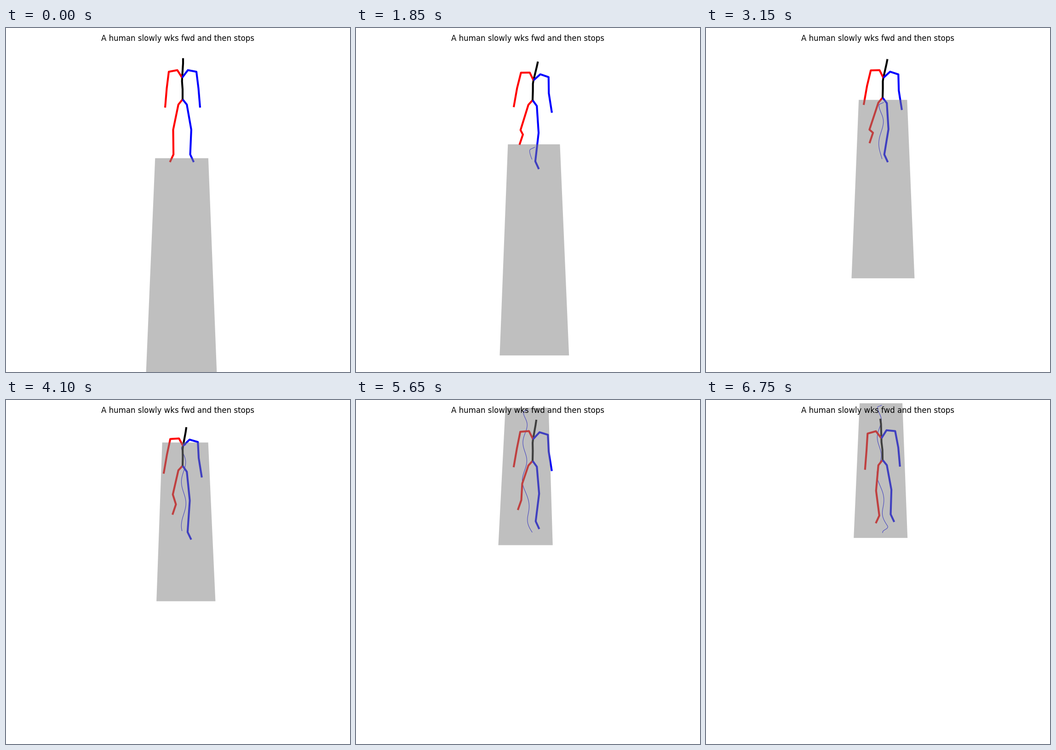
Write a matplotlib script that moves like this. It is 748 px wide and 748 px high and loops after 6800 ms.

```python
import numpy as np
import matplotlib.pyplot as plt
from matplotlib.animation import FuncAnimation
from matplotlib.patches import Polygon

SIZE, DPI = 748, 100
FRAMES, STEP = 136, 50
RED, BLUE, BLACK = "red", "blue", "black"

# Standing pose in pixels from the pelvis; the arm is the left one
SPINE = np.array([(0, 0), (0, -21.5), (-1.3, -39), (-1, -47), (1, -78), (1, -89.5)])
ARM = np.array([(11.5, -63.5), (30, -60), (34.5, -24), (38, 18)])

CYCLE = 1210            # two steps, in ms
FIRST_LANDING, LAST_LANDING = 1690, 6280
THIGH, SHIN, FOOT = 60.5, 66.5, 24
FLAT, LIFT, TOE_OUT = 17, 38, 8


def ease(s):
    s = np.clip(s, 0, 1)
    return s * s * (3 - 2 * s)


def ramp(t, start, length):
    return ease((t - start) / length)


def walking(t):
    """0 while standing, 1 in full stride."""
    return ramp(t, 900, 500) * (1 - ramp(t, 5850, 600))


def wave(t, peak):
    return np.cos(2 * np.pi * (t - peak) / CYCLE)


def curve(t, points):
    """Monotone cubic through the given points."""
    ts, vs = np.array(points, float).T
    t = np.clip(t, ts[0], ts[-1])
    h = np.diff(ts)
    d = np.diff(vs) / h
    m = np.zeros(len(ts))
    same = d[:-1] * d[1:] > 0
    a, b = d[:-1][same], d[1:][same]
    m[1:-1][same] = 2 * a * b / (a + b)
    k = np.clip(np.searchsorted(ts, t, side="right") - 1, 0, len(h) - 1)
    s = (t - ts[k]) / h[k]
    return (vs[k] + (vs[k + 1] - vs[k]) * s * s * (3 - 2 * s)
            + h[k] * s * (1 - s) * (m[k] * (1 - s) - m[k + 1] * s))


def root_z(t):
    return curve(t, [(900, 0), (1400, 14), (1850, 70), (3150, 316),
                     (4100, 500), (4900, 654), (5650, 743.5), (6750, 778)])


def root_x(t):
    """Drift of the path plus the sway of each stride."""
    drift = (-6.5 * ramp(t, 900, 500) + 15.5 * ramp(t, 3900, 1500)
             - 6.5 * ramp(t, 5950, 500))
    return drift - 5.5 * walking(t) * wave(t, 1500)


def project(x, h, z):
    """Camera pitched 30 degrees down; h is height, z points to the viewer."""
    v = 90 + 0.866 * h - 0.5 * z
    depth = 0.5 * h + 0.866 * z - 157
    scale = 1 / (1 - depth / 2600)
    return np.array([384 + x * scale, 374 - v * scale])


def plan_steps():
    """Lift time, landing time and foothold of every step, keyed by side."""
    steps = {-1: [], 1: []}
    landings = [FIRST_LANDING + CYCLE / 2 * n for n in range(7)] + [LAST_LANDING]
    for n, land in enumerate(landings):
        side = 1 if n % 2 == 0 else -1
        x = -12 + 20 * ramp(land, 3900, 1400) + 13 * side
        z = min(root_z(land) + 58, 778)
        steps[side].append((land - min(640 + 60 * n, 840), land, x, z))
    return steps


STEPS = plan_steps()


def foot(t, side):
    """Ankle x, z, rise above the ground and foot pitch in radians."""
    x = 17.5 if side > 0 else -21 - 7 * ramp(t, 250, 500)
    z, rise, pitch = 0, 0, 19
    for lift, land, nx, nz in STEPS[side]:
        s = np.clip((t - lift) / (land - lift), 0, 1)
        size = min(1, (nz - z) / 130)
        go = ease(s ** 1.6)
        rise += LIFT * size * np.sin(np.pi * s ** 1.15) ** 2
        pitch += size * np.interp(s, [0, 0.28, 0.6, 0.9, 1], [0, 40, 40, -20, 0])
        x, z = x + (nx - x) * go, z + (nz - z) * go
        if s < 1:
            break
    return x, z, rise, np.radians(pitch)


def leg(hip, ankle, pitch, side):
    """Two-bone leg whose knee bends forward and a little outward."""
    (hx, hh, hz), (kx, kh, kz) = hip, ankle
    full = np.hypot(kh - hh, kz - hz)
    uh, uz = (kh - hh) / full, (kz - hz) / full
    reach = min(full, THIGH + SHIN - 0.2)
    along = (THIGH ** 2 - SHIN ** 2 + reach ** 2) / (2 * reach)
    bend = np.sqrt(max(THIGH ** 2 - along ** 2, 0))
    along *= full / reach
    knee = ((hx + kx) / 2 + side * (5 + 0.2 * bend),
            hh + uh * along + uz * bend,
            hz + uz * along - uh * bend)
    toe = (kx + side * TOE_OUT,
           kh - FOOT * np.sin(pitch), kz + FOOT * np.cos(pitch))
    return [project(*p) for p in (hip, knee, ankle, toe)]


def upper_body(t):
    """Spine, right arm and left arm, leaning and dipping with the stride."""
    lean = walking(t) * (1 + 7 * wave(t, 1850)) - 4.5 * ramp(t, 5850, 600)
    dip = 5.5 * ramp(t, 900, 700) * (1 - ramp(t, 4300, 1400))

    def pose(pts, least):
        x, y = pts.T
        dx = lean * (y / 78) ** 2 + 3.5 * walking(t) * np.sign(x) * (y > 0)
        dy = lean * 0.02 * x + dip * np.clip(-y / 65, least, 1)
        return pts + np.column_stack([dx, dy])

    spine = pose(SPINE, 0)
    arms = [np.vstack([spine[3], pose(ARM * [side, 1], 0.6)]) for side in (-1, 1)]
    return [spine, *arms]


TIMES = np.arange(FRAMES) * STEP
ROOT_X, ROOT_Z = root_x(TIMES), root_z(TIMES)

fig = plt.figure(figsize=(SIZE / DPI, SIZE / DPI), dpi=DPI, facecolor="white")
ax = fig.add_axes([0, 0, 1, 1])
ax.set_xlim(0, SIZE)
ax.set_ylim(SIZE, 0)
ax.axis("off")


def line(color, width):
    return ax.plot([], [], color=color, lw=width, solid_capstyle="butt",
                   solid_joinstyle="round", zorder=2)[0]


trail = line(BLUE, 0.75)
limbs = [line(c, 3) for c in (RED, BLUE, BLACK, RED, BLUE)]
floor = Polygon(np.zeros((4, 2)), facecolor=(0.5, 0.5, 0.5, 0.5), lw=0, zorder=3)
ax.add_patch(floor)
ax.text(374, 28, "A human slowly wks fwd and then stops", fontsize=12,
        family="DejaVu Sans", ha="center", va="baseline", zorder=4)


def draw(i):
    t, rx, rz = TIMES[i], ROOT_X[i], ROOT_Z[i]

    left, right, back, front = -63.6 - rx, 59.5 - rx, -13.5 - rz, 802 - rz
    floor.set_xy([project(x, 0, z) for x, z in
                  ((left, back), (right, back), (right, front), (left, front))])
    trail.set_data(*project(ROOT_X[:i] - rx, 0, ROOT_Z[:i] - rz))

    ground = 28 * ramp(t, 2400, 2950)
    feet = {side: foot(t, side) for side in (-1, 1)}
    split = feet[1][1] - feet[-1][1]
    height = ground + 156.5 - 0.0003 * split ** 2
    pelvis = project(0, height, 0)

    chains = []
    for side, (x, z, rise, pitch) in feet.items():
        hip = (9.5 * side, height - 13 - 0.01 * side * split, 0.015 * side * split)
        ankle = (x - rx, ground + FLAT + rise, z - rz)
        chains.append([pelvis] + leg(hip, ankle, pitch, side))
    chains += [pelvis + part for part in upper_body(t)]

    for limb, pts in zip(limbs, chains):
        limb.set_data(*np.array(pts).T)
    return [trail, floor, *limbs]


anim = FuncAnimation(fig, draw, frames=FRAMES, interval=STEP, repeat=True,
                     repeat_delay=0, blit=False)
plt.show()
```
